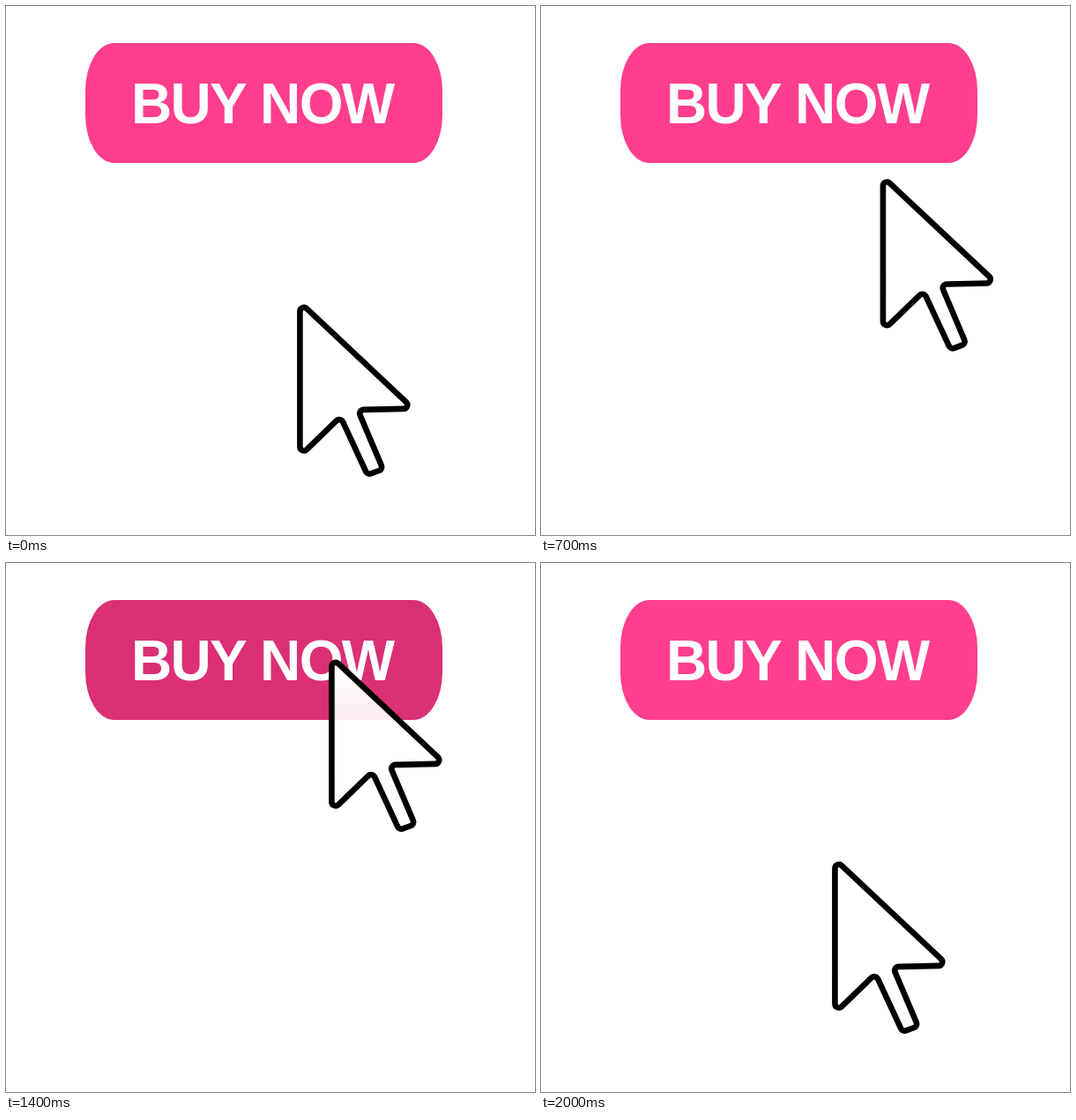
Recreate the animation shown at these times as an HTML page with a canvas. Size 600 by 600 pixels, loop 2100 ms.

```html
<!DOCTYPE html>
<html lang="en">
<head>
<meta charset="utf-8">
<title>Buy now button</title>
<style>
  html, body { margin: 0; width: 100%; height: 100%; overflow: hidden; background: #fff; }
  canvas { display: block; width: 600px; height: 600px; }
</style>
</head>
<body>
<canvas id="stage" width="600" height="600"></canvas>
<script>
const ctx = document.getElementById('stage').getContext('2d');
const LOOP = 2100, STEP = 100;
const ARRIVE = 1200, PRESS = 1400, LEAVE = 1600, RETURNED = 2000;
const PINK = '#ff3e8e', PRESSED = '#db2f76';
const START = { x: 330, y: 339 }, BUTTON = { x: 366, y: 110 };

// Sharp cursor corners relative to its box, rounded when drawn
const corners = [
  [3.4, -3], [131.8, 117.6], [69, 119], [97.6, 186.4],
  [80, 192.8], [49.4, 127], [3.4, 171.5]
];
const ROUNDING = 4.5;

const mix = (a, b, u) => a + (b - a) * u;
const progress = (t, from, to) => Math.min(1, Math.max(0, (t - from) / (to - from)));

// Bows out to the right on the way up, then returns in a straight line
function cursorAt(t) {
  const away = t >= LEAVE;
  const u = away ? 1 - progress(t, LEAVE, RETURNED) : progress(t, 0, ARRIVE);
  const bow = away ? 0 : u * (1 - u);
  return {
    x: mix(START.x, BUTTON.x, u) + bow * (139 - 165 * (u - 0.5) ** 2),
    y: mix(START.y, BUTTON.y, u) - bow * 36
  };
}

function drawButton(pressed) {
  ctx.fillStyle = pressed ? PRESSED : PINK;
  ctx.beginPath();
  ctx.roundRect(90, 42, 405, 136, { x: 33, y: 54 });
  ctx.fill();

  ctx.fillStyle = '#fff';
  ctx.font = 'bold 64px "Liberation Sans", Arial, sans-serif';
  ctx.fontKerning = 'none';
  ctx.letterSpacing = '-1.7px';
  ctx.fillText('BUY NOW', 142, 132.5);
}

function drawCursor({ x, y }) {
  ctx.save();
  ctx.translate(x, y);
  ctx.beginPath();
  ctx.moveTo(corners[0][0], 80);
  corners.forEach(([cx, cy], i) => {
    const [nx, ny] = corners[(i + 1) % corners.length];
    ctx.arcTo(cx, cy, nx, ny, ROUNDING);
  });
  ctx.closePath();

  const fill = ctx.createLinearGradient(0, 12, 0, 55);
  fill.addColorStop(0, 'rgba(255,255,255,1)');
  fill.addColorStop(1, 'rgba(255,255,255,0.92)');
  ctx.fillStyle = fill;
  ctx.fill();
  ctx.strokeStyle = '#000';
  ctx.lineWidth = 6.6;
  ctx.stroke();
  ctx.restore();
}

function draw(ms) {
  const t = Math.floor((ms % LOOP) / STEP) * STEP;
  ctx.fillStyle = '#fff';
  ctx.fillRect(0, 0, 600, 600);
  drawButton(t >= PRESS && t < LEAVE);
  drawCursor(cursorAt(t));
}

const begin = performance.now();
function tick() {
  draw(performance.now() - begin);
  requestAnimationFrame(tick);
}
tick();
</script>
</body>
</html>
```
